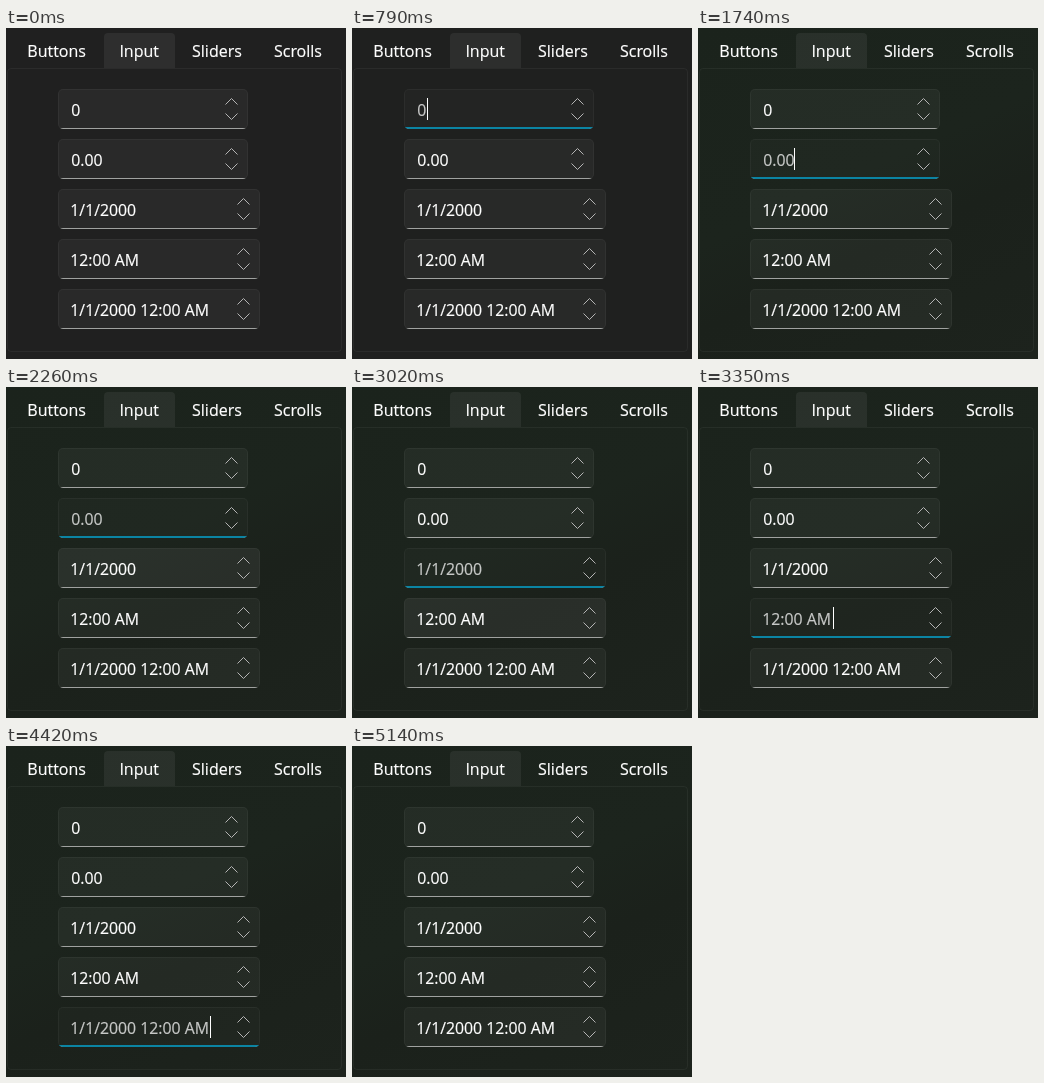
Write an HTML page that moves like this. It is 340 px wide and 331 px high and loops after 5.17 s.

```html
<!DOCTYPE html>
<html lang="en">
<head>
<meta charset="utf-8">
<title>Input fields</title>
<style>
@property --focus { syntax: "<number>"; inherits: true; initial-value: 0; }
@property --caret { syntax: "<number>"; inherits: true; initial-value: 0; }
@property --hover { syntax: "<number>"; inherits: true; initial-value: 0; }

html, body { margin: 0; width: 100%; height: 100%; overflow: hidden; background: #202020; }
body {
  color: #fff; font: 16px "Open Sans", "Noto Sans", sans-serif; white-space: pre;
  -webkit-text-stroke: .2px;
}

.stage { position: absolute; left: 0; top: 0; width: 340px; height: 331px; overflow: hidden; }
.stage > * { position: absolute; box-sizing: border-box; }

.tint {
  inset: 0;
  background: linear-gradient(155deg, #1b231c, #1c241d 45%, #1b211b 62%, #1d231d);
  animation: tint 5170ms infinite;
}
.panel { left: 1px; top: 40px; width: 335px; height: 284px; border: 1px solid #ffffff0d; border-radius: 4px; }
.active { left: 98px; top: 5px; width: 71px; height: 35px; border-radius: 4px 4px 0 0; background: #ffffff10; }
.tab { top: 0; line-height: 46px; }

.field {
  --pad: 12.3px;
  left: 52px; top: var(--y); width: 202px; height: 40px;
  overflow: hidden; border-radius: 5px;
  background: rgb(255 255 255 / calc(.045 + .018 * var(--hover) - .027 * var(--focus)));
  box-shadow: inset 0 0 0 1px #ffffff0a;
  animation: 5170ms step-end infinite;
}
.narrow { --pad: 13.2px; width: 190px; }
.field > * { position: absolute; }
.field span {
  left: var(--pad); top: 0; font-size: 15.8px; line-height: 42px;
  opacity: calc(1 - .25 * var(--focus));
}
.field i { left: var(--x); top: 9px; width: 1px; height: 22px; background: #fff; opacity: var(--caret); }
.field svg { right: 10px; top: 0; width: 13px; height: 40px; fill: none; stroke: #b4b4b4; }
.field::before, .field::after { content: ""; position: absolute; left: 0; right: 0; bottom: 0; }
.field::before { height: 1px; background: #a0a2a0; }
.field::after { height: 2px; background: #0b84a3; opacity: var(--focus); }

@keyframes tint {
  0% { opacity: 0; }
  14.7% { opacity: 0; animation-timing-function: steps(5, jump-both); }
  18.182%, 100% { opacity: 1; }
}
@keyframes integer {
  14.7% { --focus: 1; --caret: 1; }
  25.145% { --focus: 1; --caret: 0; }
  33.656% { --focus: 0; --caret: 0; }
}
@keyframes decimal {
  23.791% { --hover: 1; --focus: 0; --caret: 0; }
  33.656% { --hover: 0; --focus: 1; --caret: 1; }
  43.714% { --hover: 0; --focus: 1; --caret: 0; }
  48.549% { --hover: 0; --focus: 0; --caret: 0; }
}
@keyframes date {
  42.5% { --hover: 1; --focus: 0; --caret: 0; }
  48.549% { --hover: 0; --focus: 1; --caret: 1; }
  58.414% { --hover: 0; --focus: 1; --caret: 0; }
  64.797% { --hover: 0; --focus: 0; --caret: 0; }
}
@keyframes time {
  57% { --hover: 1; --focus: 0; --caret: 0; }
  64.797% { --hover: 0; --focus: 1; --caret: 1; }
  74.662% { --hover: 0; --focus: 1; --caret: 0; }
  84.913% { --hover: 0; --focus: 0; --caret: 0; }
}
@keyframes datetime {
  72.727% { --hover: 1; --focus: 0; --caret: 0; }
  84.913% { --hover: 0; --focus: 1; --caret: 1; }
  95.358% { --hover: 0; --focus: 1; --caret: 0; }
  99.42% { --hover: 0; --focus: 0; --caret: 0; }
}
</style>
</head>
<body>
<svg width="0" height="0" style="position:absolute">
  <path id="arrows" d="M.5 15.5l6-6 6 6M.5 24.5l6 6 6-6"/>
</svg>
<div class="stage">
  <div class="tint"></div>
  <div class="panel"></div>
  <div class="active"></div>
  <div class="tab" style="left:21.3px">Buttons</div>
  <div class="tab" style="left:113.4px">Input</div>
  <div class="tab" style="left:186px">Sliders</div>
  <div class="tab" style="left:268px">Scrolls</div>

  <div class="field narrow" style="--y:61px; --x:23px; animation-name:integer"><span>0</span><i></i><svg><use href="#arrows"/></svg></div>
  <div class="field narrow" style="--y:111px; --x:44px; animation-name:decimal"><span>0.00</span><i></i><svg><use href="#arrows"/></svg></div>
  <div class="field" style="--y:161px; --x:77px; animation-name:date"><span>1/1/2000</span><i></i><svg><use href="#arrows"/></svg></div>
  <div class="field" style="--y:211px; --x:83px; animation-name:time"><span>12:00 AM</span><i></i><svg><use href="#arrows"/></svg></div>
  <div class="field" style="--y:261px; --x:152px; animation-name:datetime"><span>1/1/2000 12:00 AM</span><i></i><svg><use href="#arrows"/></svg></div>
</div>
</body>
</html>
```
